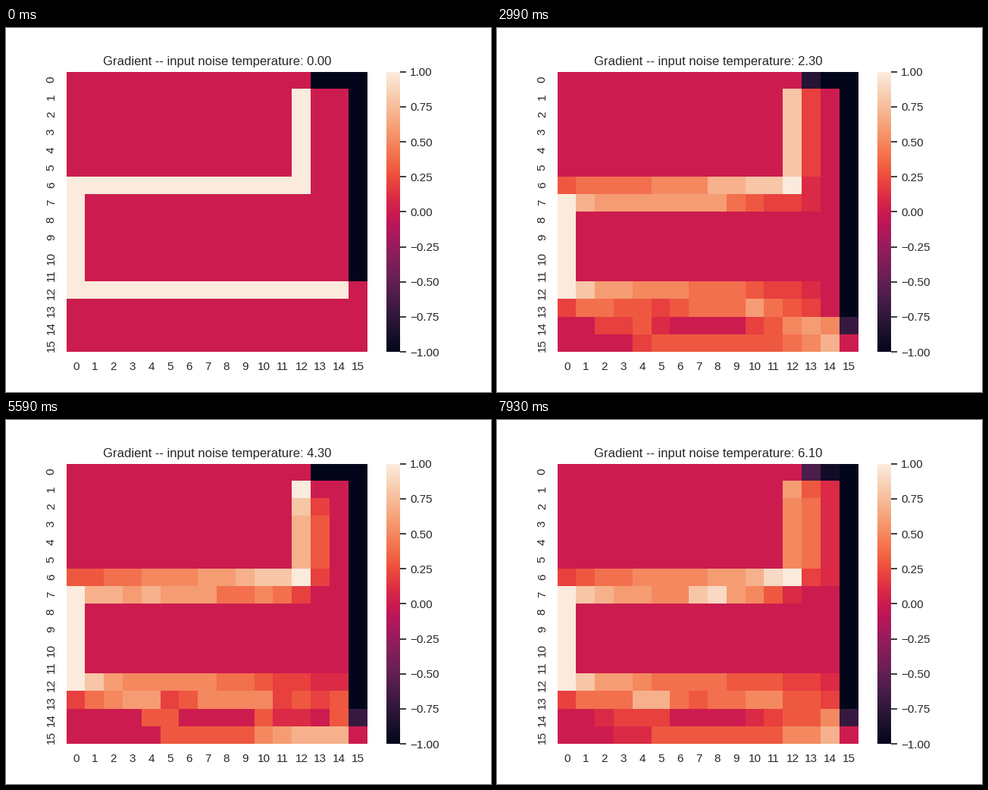
A matplotlib script that plays this animation: 640x480 px, repeating every 8000 ms.

```python
import numpy as np
import matplotlib.pyplot as plt
from matplotlib.animation import FuncAnimation
from matplotlib.colors import LinearSegmentedColormap

N = 16
PATHS = 10                  # every picture averages ten paths
STEPS, HOLD = 62, 130       # temperatures, ms per temperature
LOOP, TICK = 8000, 40
INK = "0.15"
COLS = np.arange(N - 1)

WARM = LinearSegmentedColormap.from_list("warm", [
    (0, "#03051a"), (1 / 11, "#221331"), (1 / 7, "#35193e"), (0.2, "#4c1d4b"),
    (0.25, "#611f53"), (1 / 3, "#841e5a"), (0.4, "#a11a5b"), (5 / 11, "#b91657"),
    (0.5, "#cb1b4f"), (6 / 11, "#d92847"), (0.6, "#e83f3f"), (7 / 11, "#ed503e"),
    (2 / 3, "#f06043"), (5 / 7, "#f37651"), (0.75, "#f4875e"), (0.8, "#f69c73"),
    (6 / 7, "#f6b48f"), (10 / 11, "#f7c9aa"), (1, "#faebdd")], N=256)


def upto(cols):
    """How many steps lie at or left of each column."""
    return np.searchsorted(np.sort(cols), COLS, "right")


def before(cols):
    return np.searchsorted(np.sort(cols), COLS, "left")


def cross(g, row, down, lift=()):
    """Move paths from row to row + 1 at the down columns, back at the lifts."""
    g[row, :-1] += upto(lift) - before(down)
    g[row + 1, :-1] += upto(down) - before(lift)
    g[row, -1] += len(lift) - len(down)


def straight():
    """All paths together: along the top, down, left, down and right."""
    g = np.zeros((N, N))
    g[0, 13:] = g[:12, -1] = -PATHS
    g[1:6, 12] = g[6, :13] = g[6:12, 0] = g[12, :-1] = PATHS
    return g


def spread(rng, quantiles, cols):
    """One column per path, drawn evenly from a quantile curve."""
    q = (np.arange(PATHS) + rng.random(PATHS)) / PATHS
    return np.interp(q, quantiles, cols).astype(int)


def middle(g, rng, wobbles):
    ups = spread(rng, [0, 0.25, 0.42, 0.5, 0.83, 1], [0, 1, 3, 7, 12, 13])
    dips = rng.integers(3, 11, wobbles)
    ups = np.append(ups, dips + 1)
    g[6, :13] = (upto(ups) - before(dips))[:13]
    g[7, :-1] = PATHS - before(ups) + upto(dips)


def bottom(g, rng, wobbles):
    first = spread(rng, [0, 0.2, 0.4, 0.5, 0.6, 0.8, 1],
                   [0, 1, 2.5, 4, 8, 11.5, 15])
    second, third = [], []
    for i, col in enumerate(first):
        if i < 3:               # these drop to the last row early
            b = max(col, rng.integers(2, 5))
            c = rng.integers(b, 6)
        else:
            b = max(col, rng.integers(10, 15))
            c = b + rng.integers(0, 5)
        second.append(b)
        third.append(c)
    loose = rng.integers(3, 11, wobbles)
    cross(g, 12, np.append(first, loose), loose + 1)
    cross(g, 13, [b for b in second if b < N - 1])
    cross(g, 14, [c for c in third if c < N - 1])


def right(g, rng, heat):
    mid, far = np.zeros(7), np.zeros(7)
    for _ in range(round(PATHS * (0.05 + 0.5 * heat ** 1.5))):
        side = far if rng.random() < 0.4 * heat ** 3 else mid
        side[rng.integers(0, 3):rng.integers(5, 8)] += 1
    g[1:6, 12] -= (mid + far)[:5]
    g[1:8, 13], g[1:8, 14] = mid, far
    g[1:8, -1] += far // 2
    g[0, 13], g[0, 14] = -g[1, 12], far[0] - PATHS


def heatmap(step):
    g = straight()
    if step:
        rng = np.random.default_rng(step)
        heat = step / STEPS
        wobbles = int(6 * heat)
        middle(g, rng, wobbles)
        bottom(g, rng, wobbles)
        right(g, rng, heat)
    return np.clip(g, -PATHS, PATHS) / PATHS


plt.rcParams.update({
    "font.family": "Liberation Sans", "text.color": INK,
    "xtick.color": INK, "ytick.color": INK,
    "xtick.labelsize": 11, "ytick.labelsize": 11, "axes.titlesize": 12,
    "xtick.major.size": 6, "ytick.major.size": 6,
    "xtick.major.width": 1.25, "ytick.major.width": 1.25,
    "pcolormesh.snap": False})

fig, ax = plt.subplots(figsize=(6.4, 4.8), dpi=100)
mesh = ax.pcolormesh(heatmap(0), cmap=WARM, vmin=-1, vmax=1)
ax.set(xlim=(0, N), ylim=(N, 0))
ax.set_xticks(np.arange(N) + 0.5, range(N))
ax.set_yticks(np.arange(N) + 0.5, range(N), rotation="vertical")
ax.tick_params(bottom=False, left=False)
ax.spines[:].set_visible(False)
bar = fig.colorbar(mesh, ax=ax)
bar.outline.set_linewidth(0)
title = ax.set_title("")


def update(i):
    # a change falling inside a tick is shown from its start
    step = min(STEPS - 1, (i * TICK + TICK - 10) // HOLD)
    mesh.set_array(heatmap(step))
    title.set_text(f"Gradient -- input noise temperature: {step / 10:.2f}")
    return mesh, title


anim = FuncAnimation(fig, update, frames=LOOP // TICK, interval=TICK,
                     repeat=True, repeat_delay=0, blit=False)
plt.show()
```
